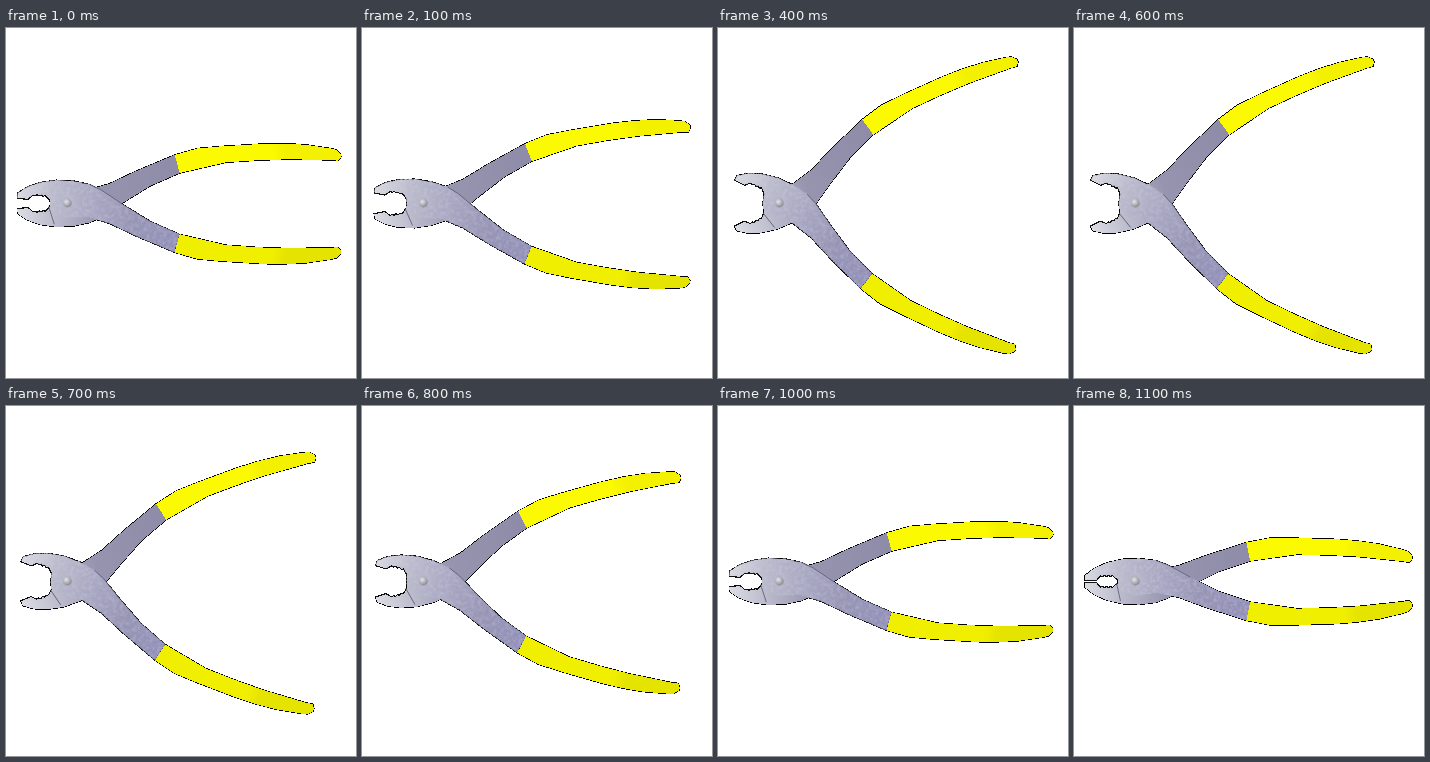
An HTML page that plays this animation: 350 by 350 pixels, repeating every 2100 ms.

```html
<!DOCTYPE html>
<html lang="en">
<head>
<meta charset="utf-8">
<title>Pliers</title>
<style>
  html, body { margin: 0; width: 100%; height: 100%; overflow: hidden; background: #fff; }
  svg { display: block; width: 100vw; height: 100vh; animation: squeeze 2100ms step-end infinite; }

  /* --open is how far each half turns away from the closed pose */
  @keyframes squeeze {
    0%       { --open: 5deg; }
    4.7619%  { --open: 11.1deg; }
    9.5238%  { --open: 17.2deg; }
    14.2857% { --open: 21.8deg; }
    19.0476% { --open: 26deg; }
    23.8095% { --open: 27.5deg; }
    28.5714% { --open: 26deg; }
    33.3333% { --open: 21.8deg; }
    38.0952% { --open: 17.2deg; }
    42.8571% { --open: 11.1deg; }
    47.619%  { --open: 5deg; }
    52.381%, 100% { --open: 0deg; }
  }
  .front, .back { transform-origin: 61px 175.5px; }
  .front { transform: rotate(calc(1.035 * var(--open))); }
  .back  { transform: rotate(calc(-1 * var(--open))); }
  .outline { fill: none; stroke: #000; stroke-width: 1.3; stroke-linejoin: round; }
  .teeth { fill: none; stroke: #111; stroke-width: 1; }
  .seam { fill: none; stroke: #5c5a70; stroke-width: .8; }
  .crisp { shape-rendering: crispEdges; }
</style>
</head>
<body>
<svg viewBox="0 0 350 350">
  <defs>
    <linearGradient id="steelFront" gradientUnits="userSpaceOnUse" x1="11" y1="0" x2="177" y2="0">
      <stop offset="0" stop-color="#dadae2"/>
      <stop offset=".2" stop-color="#bbbbcc"/>
      <stop offset=".45" stop-color="#a9a8c2"/>
      <stop offset=".7" stop-color="#9795b4"/>
      <stop offset="1" stop-color="#918fb8"/>
    </linearGradient>
    <linearGradient id="steelBack" gradientUnits="userSpaceOnUse" x1="11" y1="0" x2="177" y2="0">
      <stop offset="0" stop-color="#dcdce4"/>
      <stop offset=".2" stop-color="#bdbdce"/>
      <stop offset=".5" stop-color="#9694ae"/>
      <stop offset="1" stop-color="#8e8ba8"/>
    </linearGradient>
    <linearGradient id="yellowFront" gradientUnits="userSpaceOnUse" x1="270" y1="0" x2="284" y2="0">
      <stop offset="0" stop-color="#f1ef00"/>
      <stop offset="1" stop-color="#e5e300"/>
    </linearGradient>
    <linearGradient id="yellowBack" gradientUnits="userSpaceOnUse" x1="270" y1="0" x2="284" y2="0">
      <stop offset="0" stop-color="#fbfa00"/>
      <stop offset="1" stop-color="#f3f100"/>
    </linearGradient>
    <radialGradient id="dome" cx=".38" cy=".35" r=".7">
      <stop offset="0" stop-color="#e4e4e8"/>
      <stop offset=".5" stop-color="#b4b4bc"/>
      <stop offset="1" stop-color="#84848e"/>
    </radialGradient>
    <filter id="mottle" x="0" y="0" width="1" height="1" color-interpolation-filters="sRGB">
      <feTurbulence type="fractalNoise" baseFrequency=".3" numOctaves="2" seed="4"/>
      <feColorMatrix values="0 0 0 0 .85  0 0 0 0 .85  0 0 0 0 .93  .7 0 0 0 -.27"/>
      <feComposite in2="SourceAlpha" operator="in" result="spots"/>
      <feMerge><feMergeNode in="SourceGraphic"/><feMergeNode in="spots"/></feMerge>
    </filter>

    <path id="metal" d="M11 174.8V169.5L20 162.5L32 157L48 153.2L65 152.4L82 154.5L94 159L116 171L146 186L176 196
      L172.5 214.5L132 201.5L105 191.5L82 187L60 190L47 184L43.5 174L38.5 169.5L36.5 170.5L34.5 169.3L32.5 170.5
      L30.5 169.3L28.5 170.7L26.5 170L22 174.8Z"/>
    <path id="grip" d="M176 196L223 202.6Q254 202.5 285 200.3L328 195.8L335 194.5L338 198V201L334 205.5
      L328 207.5L305 213Q284 216.7 262 217.8L220 219L196 219L172.5 214.5Z"/>
    <path id="bite" d="M11 174.8H22L26.5 170L28.5 170.7L30.5 169.3L32.5 170.5L34.5 169.3L36.5 170.5L38.5 169.5L43.5 174"/>
    <g id="edges"><use href="#metal"/><use href="#grip"/></g>
  </defs>

  <g class="crisp">
    <g class="back"><use href="#edges" class="outline" transform="matrix(1 0 0 -1 0 351)"/></g>
    <g class="front"><use href="#edges" class="outline"/></g>
    <g class="back">
      <g transform="matrix(1 0 0 -1 0 351)">
        <use href="#metal" fill="url(#steelBack)"/>
        <use href="#grip" fill="url(#yellowBack)"/>
        <use href="#bite" class="teeth"/>
      </g>
    </g>
    <g class="front">
      <use href="#metal" fill="url(#steelFront)" filter="url(#mottle)"/>
      <use href="#grip" fill="url(#yellowFront)"/>
      <use href="#bite" class="teeth"/>
    </g>
  </g>
  <path class="front seam" d="M82 154.5L94 159L116 171"/>
  <path class="back seam" d="M42.5 177L46.5 195"/>
  <circle cx="61.3" cy="175" r="4.4" fill="url(#dome)"/>
</svg>
</body>
</html>
```
